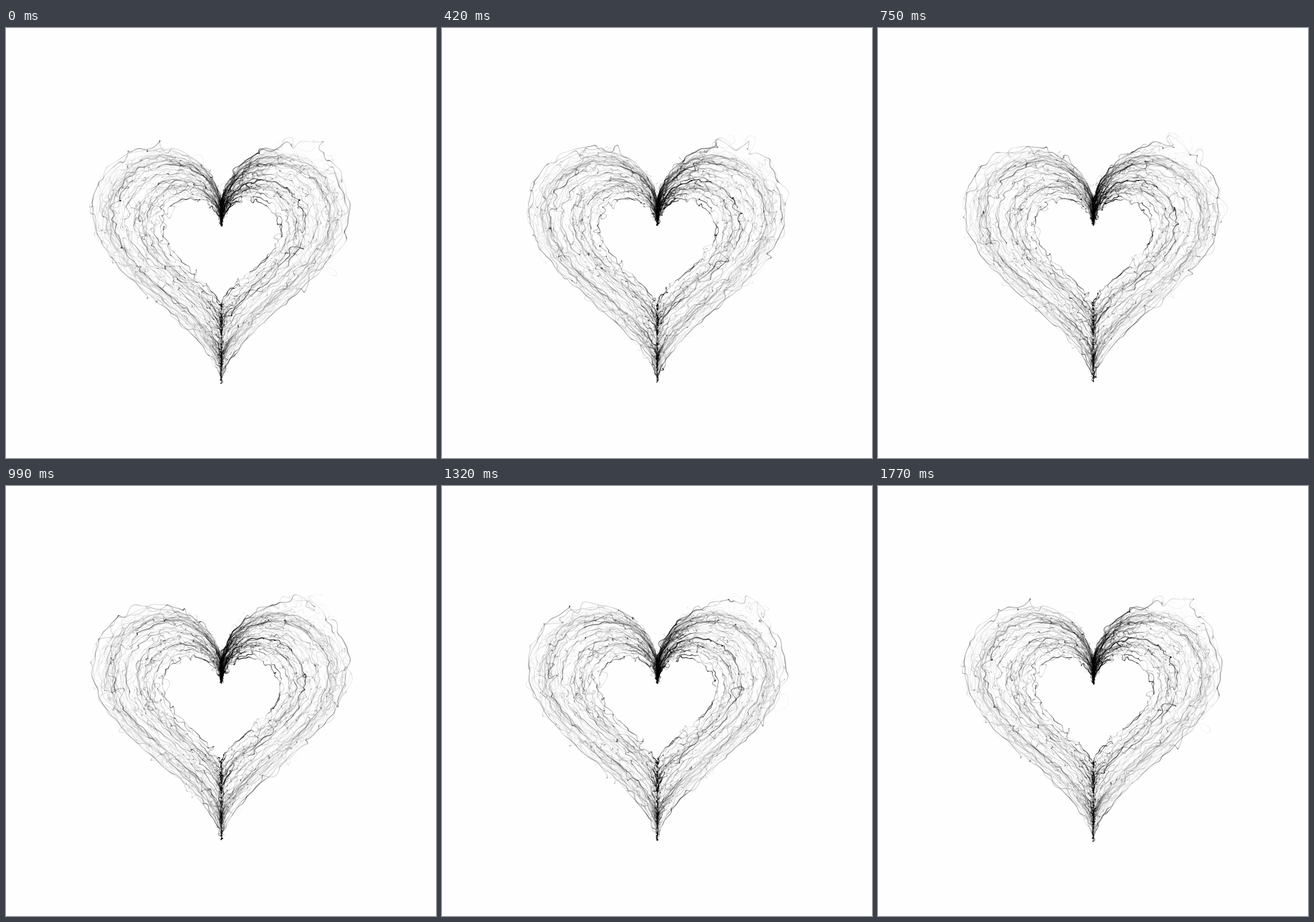
An HTML page with a canvas for the animation above (1800 ms loop, 600 by 600 pixels).

```html
<!DOCTYPE html>
<html>
<head>
<meta charset="utf-8">
<style>
html, body { margin: 0; width: 100%; height: 100%; overflow: hidden; background: #fefefe; }
canvas { display: block; }
</style>
</head>
<body>
<canvas id="c" width="600" height="600"></canvas>
<script>
const SIZE = 600, LOOP = 1800, STEP = 30, POINTS = 3000, TAU = Math.PI * 2;
const ctx = document.getElementById('c').getContext('2d');
const image = ctx.createImageData(SIZE, SIZE);
const pixels = new Uint32Array(image.data.buffer);
const ink = new Float32Array(SIZE * SIZE);

let seed = 71;
const rnd = () => (seed = seed * 16807 % 2147483647) / 2147483647;
const between = (a, b) => a + (b - a) * rnd();
const whole = (a, b) => Math.floor(between(a, b + 1));

// sine by table, argument in turns
const TABLE = Float32Array.from({ length: 4096 }, (_, i) => Math.sin(i / 4096 * TAU));
const wave = turns => TABLE[(turns * 4096) & 4095];

// unit heart, clockwise from the notch
const curve = Array.from({ length: POINTS }, (_, i) => {
  const a = i / POINTS * TAU, s = Math.sin(a);
  return {
    p: i / POINTS,
    x: 16 * s ** 3,
    y: -(13 * Math.cos(a) - 5 * Math.cos(2 * a) - 2 * Math.cos(3 * a) - Math.cos(4 * a)),
    side: s,
    calm: 0.25 + 0.75 * Math.abs(s),
    start: 1 + 1.3 * Math.exp(-((a / 0.85) ** 4)),
    flare: Math.exp(-(((a - 1.05) / 0.17) ** 2))
  };
});

// ripples travel about a tenth of the outline per loop
const ripple = (lo, hi) => {
  const f = whole(lo, hi);
  return { f, n: Math.round(f / 10), o: rnd() };
};
const at = (r, p, t) => wave(r.n * t - r.f * p + r.o);

function strand(scale, right, left, amp) {
  return {
    scale, right, left, amp,
    burst: ripple(8, 14),
    zone: { f: whole(2, 5), n: 0, o: rnd() },
    drift: { f: whole(2, 4), n: 0, o: rnd() },
    shade: ripple(9, 17),
    rx: [ripple(26, 38), ripple(44, 62), ripple(70, 95)],
    ry: [ripple(26, 38), ripple(44, 62), ripple(70, 95)]
  };
}

// scale, ink on the right side, ink on the left side
const strands = [
  [5.15, .2, .16], [5.35, .16, .13], [6, .1, .13], [6.6, .15, .14],
  [7.2, .3, .14], [7.4, .24, .12], [8.2, .1, .16], [9.3, .15, .25],
  [9.5, .11, .19], [10.3, .1, .12], [11, .19, .15], [11.2, .23, .2]
].map(([s, r, l]) => strand(s, r, l, 6.5));
for (let i = 0; i < 46; i++) {
  const w = between(.03, .085);
  strands.push(strand(between(5.2, 11.1), w, w, between(7, 15)));
}

function dot(x, y, w) {
  const ix = x | 0, iy = y | 0, fx = x - ix, fy = y - iy, k = iy * SIZE + ix;
  ink[k] += w * (1 - fx) * (1 - fy);
  ink[k + 1] += w * fx * (1 - fy);
  ink[k + SIZE] += w * (1 - fx) * fy;
  ink[k + SIZE + 1] += w * fx * fy;
}

const shake = (r, p, t) => at(r[0], p, t) + 0.6 * at(r[1], p, t) + 0.3 * at(r[2], p, t);

function drawStrand(s, t) {
  const outer = s.scale > 10.6 ? 1 : 0;
  for (const c of curve) {
    const p = c.p;
    const b = 0.5 + 0.5 * at(s.burst, p, t);
    const z = 0.6 + 0.4 * at(s.zone, p, t);
    const flare = outer * c.flare;
    const e = s.amp * c.calm * (0.12 + b * b * b * z + 1.1 * flare);
    const k = s.scale + 0.16 * at(s.drift, p, t);
    const tone = (s.left + (s.right - s.left) * (0.5 + 0.5 * c.side))
      * (0.75 + 0.45 * at(s.shade, p, t)) * c.start * (1 - 0.45 * flare);
    dot(300 + k * c.x + e * shake(s.rx, p, t) + 7 * flare,
        300 + k * c.y + e * shake(s.ry, p, t) - 9 * flare, tone);
  }
}

function draw(t) {
  ink.fill(0);
  for (const s of strands) drawStrand(s, t);
  for (let i = 0; i < ink.length; i++) {
    const g = Math.round(254 * Math.exp(-ink[i]));
    pixels[i] = 0xff000000 | g << 16 | g << 8 | g;
  }
  ctx.putImageData(image, 0, 0);
}

let shown = -1;
function tick() {
  const step = Math.floor(performance.now() % LOOP / STEP);
  if (step !== shown) draw((shown = step) * STEP / LOOP);
  requestAnimationFrame(tick);
}
tick();
</script>
</body>
</html>
```
